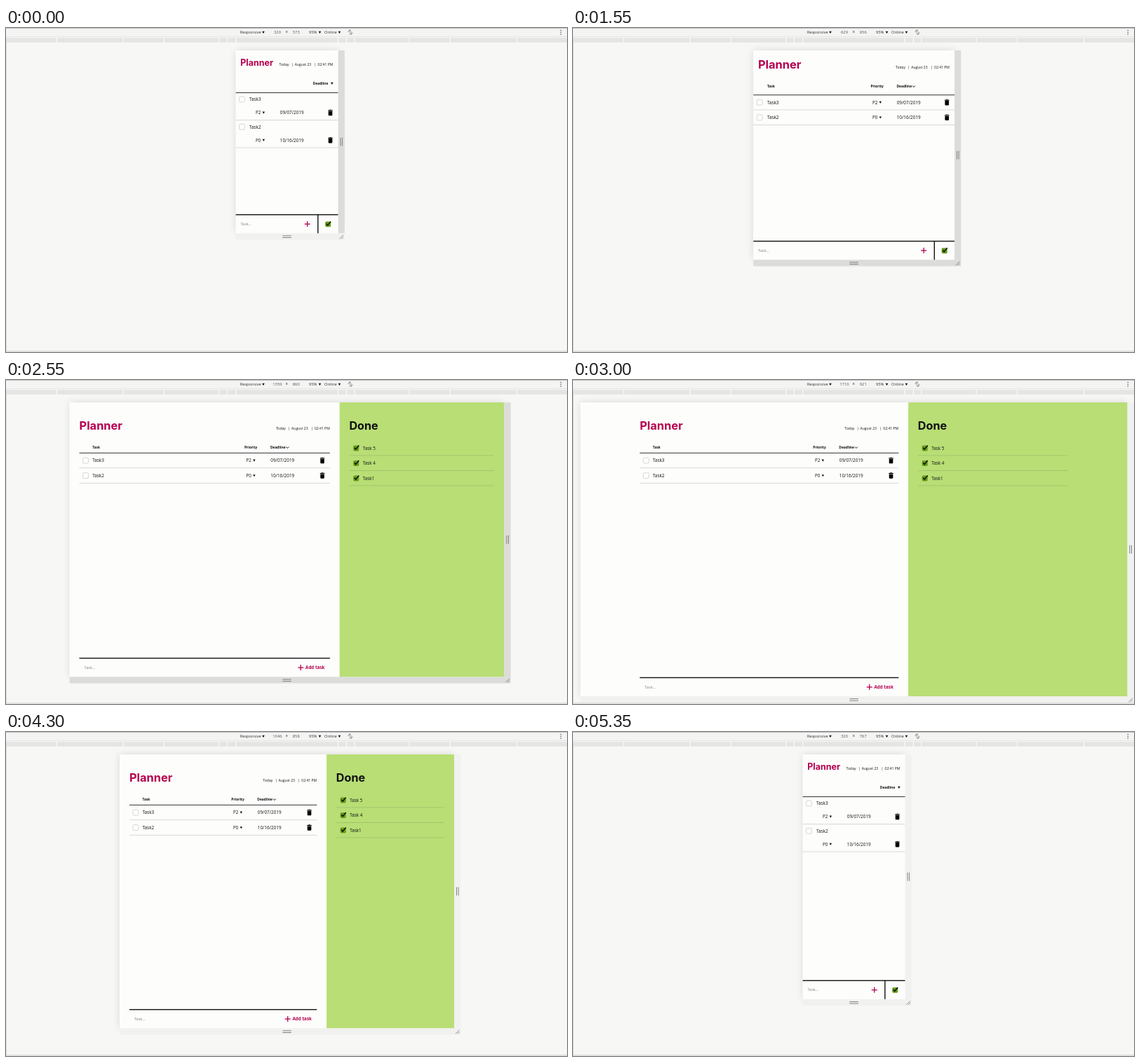
Write an HTML page with a canvas that moves like this. It is 800 px wide and 463 px high and loops after 5950 ms.

```html
<!DOCTYPE html>
<html lang="en">
<head>
<meta charset="utf-8">
<title>Responsive planner</title>
<style>
html, body { margin: 0; width: 100%; height: 100%; overflow: hidden; background: #f7f7f5; }
canvas { display: block; width: 800px; height: 463px; }
</style>
</head>
<body>
<canvas id="stage"></canvas>
<script>
const LOOP = 5950, STEP = 50, SCALE = 0.456, MID = 400.6, TOP = 32;
const PINK = '#b5004f', INK = '#111', SANS = '"Open Sans", sans-serif';
// time, viewport width, viewport height
const KEYS = [
  [0, 320, 573], [850, 320, 573], [900, 326, 575], [1400, 625, 655],
  [1500, 628, 656], [1550, 629, 656], [2050, 1046, 792], [2200, 1046, 792],
  [2250, 1070, 799], [2800, 1599, 911], [3000, 1710, 921], [3500, 1710, 921],
  [3550, 1695, 919], [3800, 1371, 875], [3900, 1371, 875], [3950, 1310, 870],
  [4100, 1050, 857], [4250, 1050, 857], [4300, 1046, 858], [4400, 744, 807],
  [4550, 744, 807], [4600, 700, 802], [4800, 441, 772], [4950, 441, 772],
  [5000, 425, 771], [5350, 320, 767], [LOOP, 320, 767]
];
const TASKS = [['Task3', 'P2', '09/07/2019'], ['Task2', 'P0', '10/16/2019']];
const DONE = ['Task 5', 'Task 4', 'Task1'];

const canvas = document.getElementById('stage');
const c = canvas.getContext('2d');
const ratio = window.devicePixelRatio || 1;
canvas.width = 800 * ratio;
canvas.height = 463 * ratio;
c.scale(ratio, ratio);

function sizeAt(t) {
  const i = KEYS.findIndex(k => k[0] > t);
  const [a, b] = [KEYS[i - 1], KEYS[i]];
  const p = (t - a[0]) / (b[0] - a[0]);
  return [1, 2].map(n => Math.round(a[n] + (b[n] - a[n]) * p));
}

function rect(x, y, w, h, color) {
  c.fillStyle = color;
  c.fillRect(x, y, w, h);
}

function box(x, y, w, h, r) {
  c.beginPath();
  c.roundRect(x, y, w, h, r);
}

function path(points, color, width) {
  c.beginPath();
  points.forEach(([x, y]) => c.lineTo(x, y));
  c.strokeStyle = color;
  c.lineWidth = width;
  c.stroke();
}

// y is the middle of the capitals
function text(s, x, y, size, color = INK, weight = 400, font = SANS) {
  c.font = `${weight} ${size}px ${font}`;
  c.fillStyle = color;
  c.fillText(s, x, y + size * 0.36);
}

function title(s, x, base, size, color) {
  text(s, x, base - size * 0.36, size, color, 700, 'Inter, sans-serif');
}

function arrow(x, y, w = 3.6) {
  c.beginPath();
  c.moveTo(x - w / 2, y - w * 0.42);
  c.lineTo(x + w / 2, y - w * 0.42);
  c.lineTo(x, y + w * 0.5);
  c.fillStyle = INK;
  c.fill();
}

function checkbox(x, y) {
  box(x - 3.9, y - 3.9, 7.8, 7.8, 1.4);
  c.fillStyle = '#fff';
  c.fill();
  c.strokeStyle = '#c4c4c4';
  c.lineWidth = 0.7;
  c.stroke();
}

function tick(x, y) {
  box(x - 4, y - 3.6, 8, 7.8, 1.7);
  c.fillStyle = '#659c16';
  c.fill();
  path([[x - 2.5, y - 0.4], [x - 0.6, y + 1.8], [x + 4, y - 3.6]], INK, 1.5);
}

function trash(x, y) {
  rect(x - 1.2, y - 4.3, 2.4, 1, '#000');
  rect(x - 3.3, y - 3.7, 6.6, 1.1, '#000');
  box(x - 2.8, y - 2.2, 5.6, 6.4, [0, 0, 1, 1]);
  c.fill();
}

function plus(x, y) {
  rect(x - 4, y - 0.6, 8, 1.3, PINK);
  rect(x - 0.65, y - 4, 1.3, 8, PINK);
}

function clock(right, y) {
  [['Today', 77], ['|', 59.7], ['August 23', 54.8], ['|', 27], ['02:41 PM', 22]]
    .forEach(([s, dx]) => text(s, right - dx, y, 5.05));
}

function headings(left, right, y) {
  text('Task', left, y, 4.9, INK, 700);
  text('Priority', right - 37, y, 4.9, INK, 700);
  text('Deadline', right, y, 4.9, INK, 700);
  path([[right + 22.6, y - 1], [right + 24.5, y + 1], [right + 26.4, y - 1]], INK, 1);
}

function details(task, right, y, trashX) {
  text(task[1], right - 34.8, y, 6.3);
  arrow(right - 23.4, y, 3.4);
  text(task[2], right, y, 6.4);
  trash(trashX, y);
}

function tableRows(left, right, textX, boxX, dateX, trashX, y) {
  TASKS.forEach((task, i) => {
    const mid = y + i * 21.6;
    checkbox(boxX, mid);
    text(task[0], textX, mid, 6.4);
    details(task, dateX, mid, trashX);
    rect(left, mid + 10.3, right - left, 0.8, '#cfcfcd');
  });
}

function narrowFooter(l, r, b) {
  rect(l, b - 27.2, r - l, 1.4, INK);
  rect(r - 29.4, b - 27, 1.4, 27, INK);
  text('Task...', l + 6.8, b - 13.3, 5.6, '#808080');
  plus(r - 43.8, b - 13.2);
  tick(r - 14.3, b - 13.2);
}

function mobile(l, r, b) {
  title('Planner', l + 6.5, 53.7, 12.5, PINK);
  clock(r - 7, 52);
  text('Deadline', r - 35.8, 79, 4.9, INK, 700);
  arrow(r - 8.7, 79.2);
  rect(l, 92, r - l, 1, '#333');
  TASKS.forEach((task, i) => {
    const y = 102 + i * 39.3;
    checkbox(l + 8.8, y);
    text(task[0], l + 19.3, y, 6.4);
    details(task, r - 82.8, y + 19, r - 11);
    rect(l, y + 29.3, r - l, 0.8, '#cfcfcd');
  });
  narrowFooter(l, r, b);
}

function tablet(l, r, b) {
  title('Planner', l + 6.8, 57.7, 16.4, PINK);
  clock(r - 7, 56);
  headings(l + 19.7, r - 82.6, 83.5);
  rect(l, 95.2, r - l, 1, '#333');
  tableRows(l, r, l + 19.7, l + 9, r - 82.3, r - 10.8, 106.3);
  narrowFooter(l, r, b);
}

function desktop(w, l, r, b) {
  const inner = Math.min(w, 1400);
  const start = MID - inner * SCALE / 2;
  const split = start + (647 + (inner - 1046) * 0.63) * SCALE;
  const left = start + 13.8, right = split - 13.8;
  const end = start + inner * SCALE - 14.5;

  title('Planner', left, 70.7, 16.4, PINK);
  clock(right, 69);
  headings(left + 18.6, right - 85, 96.5);
  rect(left, 103.8, right - left, 1, '#333');
  tableRows(left, right, left + 18.6, left + 9, right - 84.6, right - 10.8, 115);
  rect(left, b - 27.3, right - left, 1.4, INK);
  text('Task...', left + 7, b - 13.4, 5.6, '#808080');
  plus(right - 41.6, b - 13.2);
  text('Add task', right - 34.8, b - 13.2, 6.25, PINK, 700);

  rect(split, TOP, r - split, b - TOP, '#b8de75');
  title('Done', split + 13.7, 70.7, 16.2, INK);
  DONE.forEach((s, i) => {
    const y = 97.2 + i * 21.5;
    tick(split + 23.6, y);
    text(s, split + 33, y, 6.4);
    rect(split + 13.8, y + 10.3, end - split - 13.8, 0.8, '#9fbf6b');
  });
}

function handles(t, l, r, b) {
  const dark = '#dcdcda', light = '#f1f1f0';
  const grip = '#777';
  const dragging = t >= 200 && t < 2850;
  rect(r, TOP, 9.3, b - TOP, t < 2850 ? dark : light);
  rect(l, b, r - l + 9.3, 9.3, dragging ? dark : light);
  const my = (TOP + b) / 2;
  for (const d of [3, 5.6]) {
    rect(r + d, my - 6, 0.9, 12, grip);
    rect(MID - 6.3, b + d + 0.2, 12.6, 0.9, grip);
  }
  path([[r + 1.8, b + 8], [r + 7.6, b + 2.6]], grip, 0.8);
  path([[r + 4.8, b + 8], [r + 7.6, b + 5.4]], grip, 0.8);
}

function toolbar(w, h) {
  const y = 6.2, ink = '#333';
  rect(0, 0, 800, 12.6, '#f4f4f3');
  rect(0, 0, 800, 0.8, '#b5b5b5');
  rect(0, 12.4, 800, 0.6, '#dcdcdc');
  text('Responsive', 333.7, y, 5.7, ink);
  arrow(367, y);
  text(w, w > 999 ? 380.3 : 382, y, 5.8, '#555');
  text('×', 398.6, y, 6.2, ink);
  text(h, 408.8, y, 5.8, '#555');
  text('95%', 432, y, 5.7, ink);
  arrow(447.5, y);
  text('Online', 454, y, 5.8, ink);
  arrow(475.5, y);

  path([[489, 5], [490.5, 3.6], [493.2, 6.8], [491.7, 8.4], [488.6, 5.2]], '#666', 0.7);
  for (const a of [0.3, 3.44]) {
    c.beginPath();
    c.arc(491, 6, 3.2, a, a + 1.6);
    c.stroke();
  }
  for (const d of [3.4, 6.2, 9]) rect(790.7, d - 0.6, 1.3, 1.3, '#555');

  rect(0, 13, 800, 8.6, '#fafafa');
  const marks = [0.5, 72.3, 167.3, 225.5, 303.7, 315.5, 327.7, 473.3, 485.5, 497, 575.3, 633.5, 728.5, 800.5];
  marks.slice(1).forEach((x, i) => rect(marks[i] + 0.6, 13.8, x - marks[i] - 1.2, 7, '#e5e5e4'));
}

function draw(t) {
  const [w, h] = sizeAt(t);
  const l = MID - w * SCALE / 2, r = MID + w * SCALE / 2, b = TOP + h * SCALE;
  rect(0, 0, 800, 463, '#f7f7f5');
  c.save();
  c.shadowColor = 'rgba(0,0,0,0.12)';
  c.shadowBlur = 10 * ratio;
  rect(l, TOP, r - l, b - TOP, '#fdfdfc');
  c.restore();
  handles(t, l, r, b);
  rect(l, TOP, r - l, b - TOP, '#fdfdfc');
  if (w < 600) mobile(l, r, b);
  else if (w < 900) tablet(l, r, b);
  else desktop(w, l, r, b);
  toolbar(w, h);
  rect(0, 13, 0.8, 449, '#d4d4d3');
  rect(0, 461.5, 800, 0.9, '#c4c4c3');
}

function frame(now) {
  draw(Math.floor((now % LOOP) / STEP) * STEP);
  requestAnimationFrame(frame);
}
requestAnimationFrame(frame);
</script>
</body>
</html>
```
